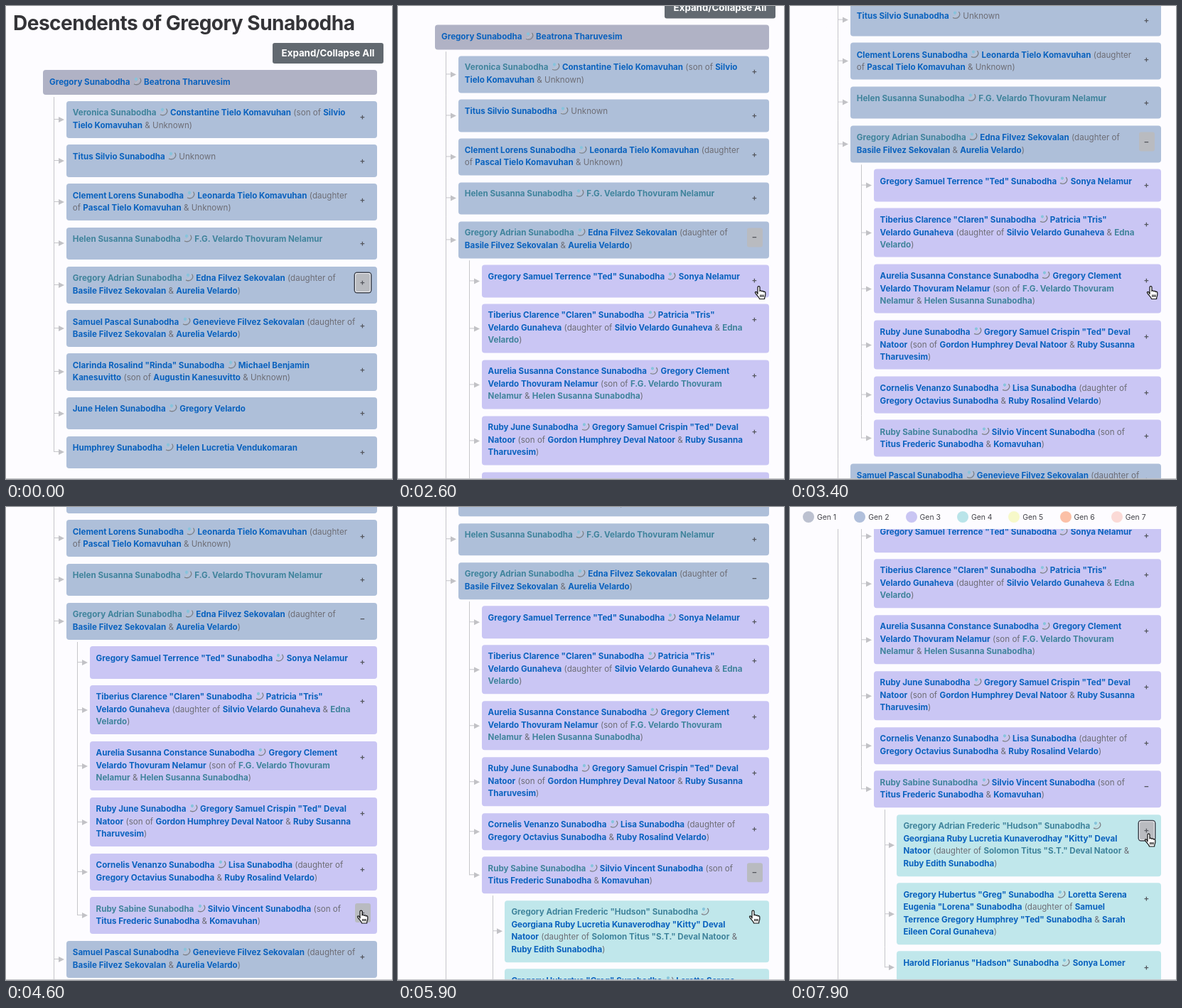
These frames come from a looping animation (543x666 px, 8000 ms). An HTML page:

```html
<!DOCTYPE html>
<html lang="en">
<head>
<meta charset="utf-8">
<title>Family tree</title>
<style>
html, body { margin: 0; width: 100%; height: 100%; overflow: hidden; background: #fdfcff; }
body { position: relative; font: 11.6px/17.52px Inter, "Open Sans", sans-serif; color: #6d6d75; white-space: nowrap; }
#page { position: absolute; left: 0; top: 0; width: 543px; height: 666px; }
h1 { position: absolute; left: 10px; top: 7px; margin: 0; font-size: 28px; line-height: 34px; letter-spacing: -.5px; color: #343438; }
#all { position: absolute; left: 375px; top: 52px; width: 156px; height: 29px; border-radius: 3px; background: #626970; color: #fff; font: 700 13.3px/29px Inter, sans-serif; text-align: center; }
#tree { position: absolute; left: 52px; top: 90px; width: 470px; }
ul { margin: 0; padding: 0 0 0 32.8px; list-style: none; }
li { position: relative; margin-top: 9.3px; }
.box { position: relative; box-sizing: border-box; min-height: 45.6px; padding: 8.55px 9px; border-radius: 4px; }
.g1 { min-height: 0; background: #b0b2c5; }
.g2 { background: #aebfd9; }
.g3 { background: #cac6f4; }
.g4 { background: #c0e7eb; }
li:not(:last-child)::before { content: ""; position: absolute; left: -17.6px; top: -6.3px; bottom: -3px; border-left: 1.5px solid #c6c6ca; }
li > .box::before { content: ""; position: absolute; left: -17.6px; top: -6.3px; bottom: 50%; width: 6px; border: solid #c6c6ca; border-width: 0 0 1.5px 1.5px; }
li > .box::after { content: ""; position: absolute; left: -11px; top: calc(50% - 4px); border: solid transparent; border-width: 4px 0 4px 8px; border-left-color: #c2c2c6; }
b { color: #0a62be; }
b.alt { color: #40849c; }
.ring { width: 13px; height: 13px; vertical-align: -2px; }
.btn { position: absolute; right: 9.5px; top: 9.3px; width: 22px; height: 27px; border-radius: 3px; font-weight: 600; line-height: 27px; text-align: center; color: #55575e; }
.btn.hover { background: #b9bbc0; }
.btn.press { box-shadow: inset 0 0 0 1px #f4f4f8, 0 0 0 1.5px #41454f; }
#legend { position: absolute; left: 0; top: 0; width: 543px; height: 31px; background: #fdfcff; font-size: 10.4px; line-height: 29px; color: #45454b; }
#legend i { position: absolute; top: 6px; width: 16px; height: 16px; border-radius: 50%; }
#legend span { position: absolute; top: 0; }
#edge { position: absolute; left: 0; top: 665px; width: 543px; height: 1px; background: #c4c4c8; }
#hand { position: absolute; left: 0; top: 0; width: 18px; height: 21px; overflow: visible; }
</style>
</head>
<body>
<div id="page">
  <h1>Descendents of Gregory Sunabodha</h1>
  <div id="all">Expand/Collapse All</div>
  <div id="tree"></div>
</div>
<div id="legend"></div>
<div id="edge"></div>
<svg id="hand" viewBox="0 0 18 21" stroke="#111" stroke-width="1.2" stroke-linejoin="round">
  <path fill="#fff" d="M5 12V2.6a1.5 1.5 0 0 1 3 0V8c.5-1.2 2.6-1 2.8.4c.6-1 2.5-.8 2.6.7c.9-.8 2.4-.2 2.4 1.2V13c0 2-1.2 3-1.2 6H7.5C7 16 3.5 14 1.8 10.8C.8 9 2.6 8 3.8 9.6z"/>
  <path d="M8.8 13v3.2M10.9 13v3.2M13 13v3.2"/>
</svg>
<script>
const LOOP = 8000;
const ring = `<svg class="ring" viewBox="0 0 13 13" fill="none"><path d="M10.4 1.6C9.5 5 6.5 8.5 2 9.8" stroke="#c6c9cf"/><path d="M10.4 1.6C14 6 9.5 13.2 2 9.8" stroke="#7d8188" stroke-width="1.3"/><path d="M3 1.8L5 .6l2 1.2-.2 2.2-1.8 1.4L3 4z" fill="#86c4dc"/></svg>`;

// *name* is a blue link, _name_ a teal one, ~ a ring, | a line break
const rows = [
  ["_Veronica Sunabodha_ ~ *Constantine Tielo Komavuhan* (son of *Silvio|Tielo Komavuhan* & Unknown)"],
  ["*Titus Silvio Sunabodha* ~ Unknown"],
  ["*Clement Lorens Sunabodha* ~ *Leonarda Tielo Komavuhan* (daughter|of *Pascal Tielo Komavuhan* & Unknown)"],
  ["_Helen Susanna Sunabodha_ ~ _F.G. Velardo Thovuram Nelamur_"],
  ["_Gregory Adrian Sunabodha_ ~ *Edna Filvez Sekovalan* (daughter of|*Basile Filvez Sekovalan* & *Aurelia Velardo*)", "son", [
    ['*Gregory Samuel Terrence "Ted" Sunabodha* ~ *Sonya Nelamur*'],
    ['*Tiberius Clarence "Claren" Sunabodha* ~ *Patricia "Tris"|Velardo Gunaheva* (daughter of *Silvio Velardo Gunaheva* & _Edna|Velardo_)'],
    ["*Aurelia Susanna Constance Sunabodha* ~ *Gregory Clement|Velardo Thovuram Nelamur* (son of _F.G. Velardo Thovuram|Nelamur_ & _Helen Susanna Sunabodha_)"],
    ['*Ruby June Sunabodha* ~ *Gregory Samuel Crispin "Ted" Deval|Natoor* (son of *Gordon Humphrey Deval Natoor* & *Ruby Susanna|Tharuvesim*)'],
    ["*Cornelis Venanzo Sunabodha* ~ *Lisa Sunabodha* (daughter of|*Gregory Octavius Sunabodha* & *Ruby Rosalind Velardo*)"],
    ["_Ruby Sabine Sunabodha_ ~ *Silvio Vincent Sunabodha* (son of|*Titus Frederic Sunabodha* & *Komavuhan*)", "daughter", [
      ['_Gregory Adrian Frederic "Hudson" Sunabodha_ ~|*Georgiana Ruby Lucretia Kunaverodhay "Kitty" Deval|Natoor* (daughter of _Solomon Titus "S.T." Deval Natoor_ &|*Ruby Edith Sunabodha*)', "grandson"],
      ['*Gregory Hubertus "Greg" Sunabodha* ~ *Loretta Serena|Eugenia "Lorena" Sunabodha* (daughter of *Samuel|Terrence Gregory Humphrey "Ted" Sunabodha* & *Sarah|Eileen Coral Gunaheva*)'],
      ['*Harold Florianus "Hadson" Sunabodha* ~ *Sonya Lomer*']
    ]]
  ]],
  ["*Samuel Pascal Sunabodha* ~ *Genevieve Filvez Sekovalan* (daughter of|*Basile Filvez Sekovalan* & *Aurelia Velardo*)"],
  ['*Clarinda Rosalind "Rinda" Sunabodha* ~ *Michael Benjamin|Kanesuvitto* (son of *Augustin Kanesuvitto* & Unknown)'],
  ["*June Helen Sunabodha* ~ *Gregory Velardo*"],
  ["*Humphrey Sunabodha* ~ *Helen Lucretia Vendukomaran*"]
];

const $ = id => document.getElementById(id);
const markup = s => s.replace(/&/g, "&amp;")
  .replace(/\*(.+?)\*/g, "<b>$1</b>")
  .replace(/_(.+?)_/g, "<b class='alt'>$1</b>")
  .replace(/\|/g, "<br>").replace(/~/g, ring);

const list = (items, gen) => items.map(([text, id, kids]) =>
  `<li><div class="box g${gen}">${markup(text)}<span class="btn"${id ? ` id="${id}"` : ""}>+</span></div>` +
  (kids ? `<ul id="${id}Kids">${list(kids, gen + 1)}</ul>` : "") + "</li>").join("");

$("tree").innerHTML = `<div class="box g1">${markup("*Gregory Sunabodha* ~ *Beatrona Tharuvesim*")}</div><ul>${list(rows, 2)}</ul>`;

$("legend").innerHTML = ["#bcc1d0", "#b0bfdb", "#c9c5f3", "#b9e4e9", "#f7f9c9", "#fbc0a6", "#fbdad6"].map((c, i) => {
  const x = 18 + i * 72.3;
  return `<i style="left:${x}px;background:${c}"></i><span style="left:${x + 20}px">Gen ${i + 1}</span>`;
}).join("");

const smooth = p => p * p * (3 - 2 * p);

// Value at t along [time, value] keys
function track(keys, t, ease = p => p) {
  const i = keys.findIndex(k => k[0] > t);
  if (i < 0) return keys[keys.length - 1][1];
  if (i === 0) return keys[0][1];
  const [t0, a] = keys[i - 1], [t1, b] = keys[i];
  return a + (b - a) * ease((t - t0) / (t1 - t0));
}

const scroll = [[1900, 0], [2600, 63.4], [3400, 198.3], [3700, 232], [5550, 232], [5900, 288.6], [6500, 371], [6900, 409.7]];
const handX = [[3800, 501], [4350, 493], [7000, 493], [7650, 498]];
const handY = [[3800, 393.5], [4350, 567], [7000, 567], [7650, 459]];
const fade = [[6400, 0], [6750, 1]];

function button(id, hover, press, open) {
  const el = $(id), kids = $(id + "Kids");
  el.classList.toggle("hover", hover);
  el.classList.toggle("press", press);
  el.textContent = open ? "−" : "+";
  if (kids) kids.style.display = open ? "" : "none";
}

function draw(t) {
  button("son", t < 3800, t < 300, t >= 300);
  button("daughter", t >= 4300 && t < 6950, t >= 4850 && t < 5050, t >= 5000);
  button("grandson", t >= 7550, t >= 7800, false);
  $("page").style.transform = `translateY(${-track(scroll, t)}px)`;
  $("legend").style.opacity = track(fade, t);
  $("hand").style.transform = `translate(${track(handX, t, smooth)}px, ${track(handY, t, smooth)}px)`;
  $("hand").style.visibility = t < 100 ? "hidden" : "visible";
}

const start = performance.now();
function tick() {
  draw((performance.now() - start) % LOOP);
  requestAnimationFrame(tick);
}
tick();
</script>
</body>
</html>
```
